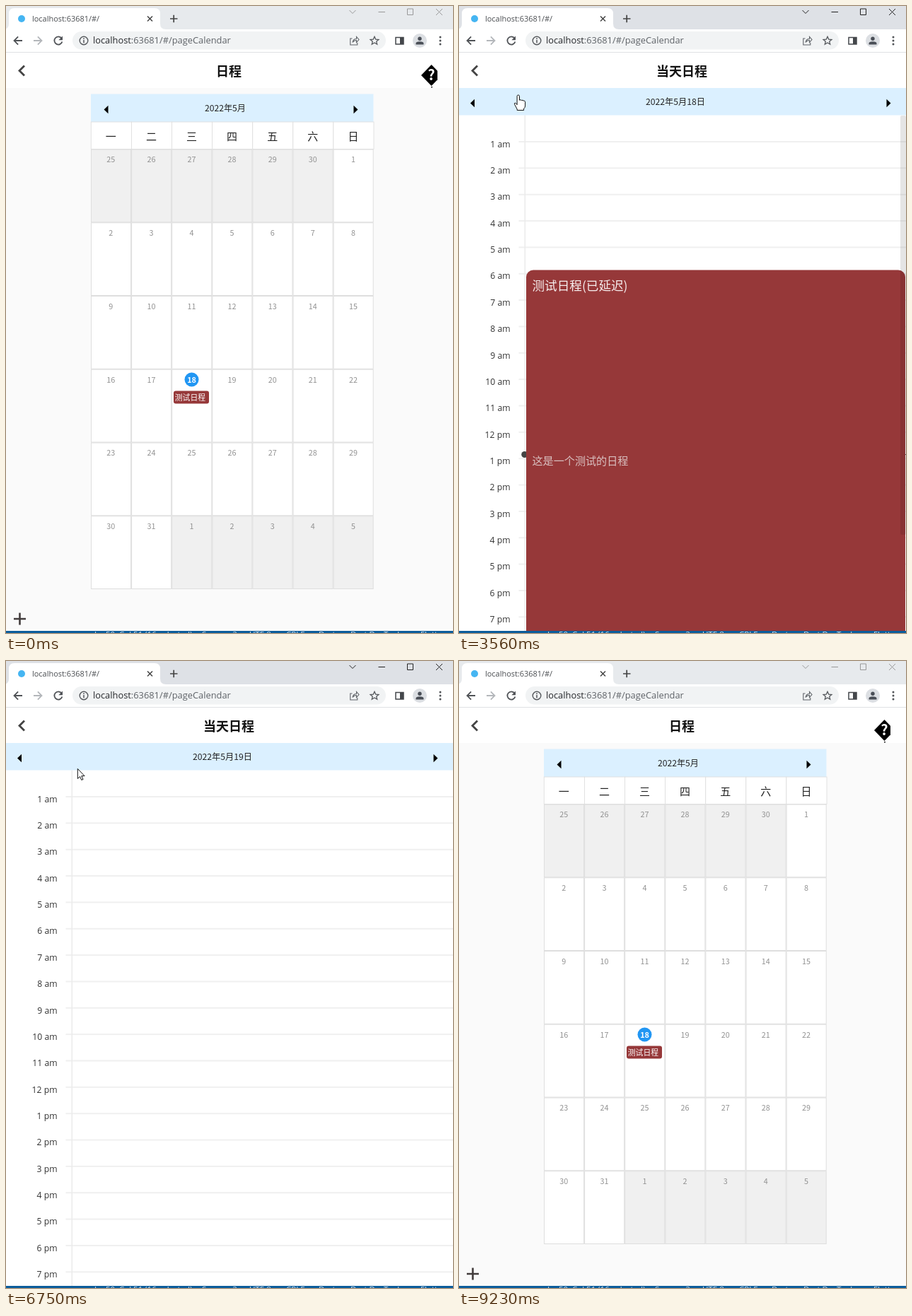
An HTML page that plays this animation: 632x887 px, repeating every 9300 ms.

```html
<!DOCTYPE html>
<html lang="zh">
<head>
<meta charset="utf-8">
<title>日程</title>
<style>
  html, body { margin: 0; width: 100%; height: 100%; overflow: hidden; background: #fff; }
  svg { display: block; width: 632px; height: 887px; }
  text { font-family: "Noto Sans CJK SC", "Noto Sans CJK", "Noto Sans CJK JP", sans-serif; }
  .latin { font-family: "Open Sans", "Noto Sans", sans-serif; }
  .mid { text-anchor: middle; }
  .line { fill: none; stroke-linecap: butt; }
</style>
</head>
<body>
<svg id="stage" viewBox="0 0 632 887"></svg>
<script>
const LOOP = 9300, WIDTH = 632, HOUR = 37.35, DAY_TOP = 154.65;
const RED = '#963839', HEADER = '#dbf0ff';

const rect = (x, y, w, h, fill, extra = '') =>
  `<rect x="${x}" y="${y}" width="${w}" height="${h}" fill="${fill}" ${extra}/>`;
const text = (x, y, size, fill, value, extra = '') =>
  `<text x="${x}" y="${y}" font-size="${size}" fill="${fill}" ${extra}>${value}</text>`;
const mid = (x, y, size, fill, value, extra = '') =>
  text(x, y, size, fill, value, `class="mid" ${extra}`);
const line = (d, stroke, width = 1, extra = '') =>
  `<path class="line" d="${d}" stroke="${stroke}" stroke-width="${width}" ${extra}/>`;
const circle = (x, y, r, fill, extra = '') =>
  `<circle cx="${x}" cy="${y}" r="${r}" fill="${fill}" ${extra}/>`;
const range = n => [...Array(n).keys()];

const triangles = (left, right, y) =>
  `<path d="M${left} ${y - 5.7}v11.4l-6-5.7ZM${right} ${y - 5.7}v11.4l6-5.7Z"/>`;
const appBar = title =>
  rect(0, 66, WIDTH, 50, '#fff') +
  mid(315, 98.8, 18, '#111', title, 'font-weight="700"');
const backIcon = line('M26 84.5l-7 7 7 7', '#444', 2.8);

function browser() {
  return `<rect id="strip" width="632" height="34"/>
    ${rect(0, 33, WIDTH, 33, '#fff')}
    <path d="M-4 33q8 0 8-8V11q0-8 8-8h198q8 0 8 8v14q0 8 8 8Z" fill="#fff"/>
    ${circle(22, 18, 5, '#45b5f2')}
    ${text(37, 22, 10.95, '#4a4d51', 'localhost:63681/#/', 'class="latin"')}
    ${line('M200 14.5l7 7m0-7l-7 7', '#444', 1.5)}
    ${line('M232 18h10.5M237.2 12.7v10.5', '#444', 1.7)}
    <g id="controls">${line('M485.5 6l4.5 4.5 4.5-4.5M526.5 8.5h9.5M567.5 4h8v8.5h-8ZM608 4l9 9m0-9l-9 9', 'currentColor')}</g>
    ${line('M23 49H11.5m5.6-5.6L11.5 49l5.6 5.6', '#505357', 1.8)}
    ${line('M39 49h11.5m-5.6-5.6L50.5 49l-5.6 5.6', '#b4b7bb', 1.8)}
    ${line('M78.2 45.2a5.6 5.6 0 1 0 1.2 5.3', '#505357', 1.8)}
    <path d="M80 42.5v5.7h-5.7Z" fill="#505357"/>
    ${rect(94, 36, 443, 25.5, '#f1f3f4', 'rx="12.7"')}
    ${circle(110, 49, 5.8, 'none', 'stroke="#55585c" stroke-width="1.4"')}
    ${line('M110 45.3v1.6M110 48v4.2', '#55585c', 1.5)}
    <text class="latin" x="123" y="53.4" font-size="12.85" fill="#25272b">localhost<tspan fill="#5f6368">:63681/#/pageCalendar</tspan></text>
    ${line('M489.5 46h-2.7v9h10v-3M490 51.5q.8-5 5.5-5v-3l3.5 4-3.5 4v-3q-3.500 0-5.500 3Z', '#5f6368', 1.1)}
    <path d="M521 43.3l1.7 3.800 4.200.4-3.200 2.700 1 4-3.700-2.200-3.700 2.200 1-4-3.200-2.700 4.200-.4Z" fill="none" stroke="#55585c" stroke-width="1.3"/>
    ${rect(551, 44.5, 11, 9.5, 'none', 'stroke="#44474b" stroke-width="1.5"')}
    ${rect(557, 44.5, 5, 9.5, '#44474b')}
    ${circle(585, 49, 10, '#dcdfe3')}
    ${circle(585, 46.2, 2.7, '#4a4f57')}
    <path d="M579.5 54.500v-1.500q0-2.800 5.500-2.800t5.500 2.800v1.500Z" fill="#4a4f57"/>
    ${[44, 49, 54].map(y => circle(614, y, 1.5, '#505357')).join('')}
    ${rect(0, 65, WIDTH, 1, '#dfe1e4')}`;
}

function calendar() {
  const col = i => 120 + 57.1 * i, row = i => 202.5 + 103.75 * i;
  const cells = range(42).map(i => {
    const x = col(i % 7), y = row(Math.floor(i / 7));
    const offset = i - 5, outside = offset < 1 || offset > 31;
    const day = offset < 1 ? offset + 30 : offset > 31 ? offset - 31 : offset;
    const today = offset === 18;
    return rect(x + .5, y + .5, 56.1, 102.75, outside ? '#f0f0f0' : '#fff', 'stroke="#dedede"') +
      (today ? circle(x + 28.3, y + 14.8, 10, '#2196f3') : '') +
      mid(x + 28.3, y + 18.9, 10.8, today ? '#fff' : '#929292', day, today ? 'font-weight="700"' : '');
  }).join('');
  const week = [...'一二三四五六日'].map((name, i) =>
    rect(col(i) + .3, 164, 57.1, 38.5, '#fff', 'stroke="#dedede" stroke-width=".9"') +
    mid(col(i) + 28.3, 189.6, 15, '#222', name)).join('');
  return rect(0, 66, WIDTH, 818, '#fafafa') + appBar('日程') + backIcon +
    `<path d="M587 98l14.500-15 8.500 8.800v12.400L601.500 113Z"/>
     ${mid(601.5, 105, 20, '#fff', '?', 'font-weight="700"')}
     ${circle(602, 114.7, 1, '#222')}` +
    rect(120, 124.5, 399.5, 39.5, HEADER) + triangles(144.5, 491.5, 146.5) +
    mid(310, 149.3, 12.15, '#222', '2022年5月') + week + cells +
    rect(237, 544.5, 50, 18, RED, 'rx="3"') +
    text(238.8, 557.8, 10.8, '#fff', '测试日程', 'font-weight="500"') +
    line('M11 867h17M19.500 858.500v17', '#423c3c', 2.6);
}

function schedule(day) {
  const hours = range(23).map(i => {
    const h = i + 1, y = DAY_TOP + h * HOUR;
    return rect(84.500, y - 1, 547.500, 2, '#f0f0f0') +
      text(72.5, y + 7.7, 12.2, '#333', `${h > 12 ? h - 12 : h} ${h < 12 ? 'am' : 'pm'}`,
        'class="latin" text-anchor="end"');
  }).join('');
  const event = line('M93 634.500h539', '#555') + circle(92.7, 634.5, 4.5, '#444') +
    rect(95, 373.5, 536, 520, RED, 'rx="10"') +
    text(103.5, 401.8, 17.6, '#f6eeee', '测试日程(已延迟)') +
    text(103.5, 649, 15.1, '#d9c0c0', '这是一个测试的日程');
  return `<g id="day${day}">${rect(0, 154, WIDTH, 900, '#fff')}${hours}
    ${rect(92.5, 154, 1.5, 900, '#ebebeb')}${day === 18 ? event : ''}</g>`;
}

function dayPage() {
  return rect(0, 66, WIDTH, 818, '#fff') + `<g clip-path="url(#list)">
    ${[17, 18, 19].map(schedule).join('')}
    ${rect(624, 155, 8, 593, '#000', 'id="thumb" rx="2"')}</g>` +
    appBar('当天日程') +
    `<g clip-path="url(#bar)">${circle(22, 91, 31, '#000', 'id="ripple"')}</g>` + backIcon +
    rect(0, 116, WIDTH, 38.5, HEADER) + triangles(22, 604.5, 137.5) +
    mid(306, 140.3, 12.2, '#222', '', 'id="date"');
}

function statusBar() {
  const items = [[125, 'Ln 50, Col 51 (16 selected)'], [277, 'Spaces: 2'], [344, 'UTF-8'],
    [396, 'CRLF'], [442, 'Dart'], [487, 'Dart DevTools'], [586, 'Flutter']];
  return rect(0, 884, WIDTH, 3, '#0b5c9b') + '<g clip-path="url(#status)">' +
    items.map(([x, label]) => text(x, 892.5, 11.500, '#d5e3ee', label, 'class="latin"')).join('') + '</g>';
}

const clip = (id, y, h) => `<clipPath id="${id}">${rect(0, y, WIDTH, h, '#000')}</clipPath>`;
const stage = document.getElementById('stage');
stage.innerHTML = `<defs>${clip('view', 66, 818)}${clip('bar', 66, 50)}
    ${clip('list', 154.5, 729.5)}${clip('status', 884, 3)}</defs>
  ${rect(0, 0, WIDTH, 887, '#fff')}
  <g clip-path="url(#view)">
    <g id="calendar">${calendar()}</g>
    ${rect(0, 66, WIDTH, 818, '#000', 'id="scrim"')}
    <g id="page">${dayPage()}</g>
  </g>
  ${browser()}${statusBar()}
  <g id="cursor" fill="#fff" stroke="#111" stroke-linejoin="round">
    <path id="arrow" d="M.5.5V14.500L3.800 11.500 6 16.500 8.200 15.500 6 10.700H10.300Z"/>
    <path id="hand" d="M-1.700 1.700a1.700 1.700 0 0 1 3.400 0V7.200q1.600-1 3 .3 1.600-.8 2.800.6 2-.4 2.300 1.600V15q0 3-2 4.200v2.300H-1.600V20L-5 13.600q-1-2 .4-2.500 1.200 0 2.900 2.600Z"/>
  </g>
  ${circle(0, 0, 10.5, '#f5e128', 'id="press" fill-opacity=".52"')}`;

const el = Object.fromEntries([...stage.querySelectorAll('[id]')].map(e => [e.id, e]));
const set = (node, attrs) => { for (const k in attrs) node.setAttribute(k, attrs[k]); };
const show = (node, on) => set(node, { visibility: on ? 'visible' : 'hidden' });

const progress = (t, from, to) => Math.min(1, Math.max(0, (t - from) / (to - from)));
const easeOut = p => 1 - (1 - p) ** 3;
const easeInOut = p => p * p * (3 - 2 * p);
const zoom = k => `translate(316 475) scale(${k}) translate(-316 -475)`;

function along(t, points) {
  const next = points.findIndex(p => p[0] > t);
  if (next === 0) return points[0].slice(1);
  if (next < 0) return points[points.length - 1].slice(1);
  const a = points[next - 1], b = points[next], p = progress(t, a[0], b[0]);
  return a.slice(1).map((v, i) => v + (b[i + 1] - v) * p);
}

const CURSOR = [[200, 600, 888], [1000, 267, 565], [2140, 267, 565], [2450, 345, 695],
  [3090, 345, 695], [3560, 84, 126], [3720, 50, 119], [3890, 19, 134], [4480, 19, 134],
  [4950, 605, 134], [6450, 605, 134], [6750, 101, 152], [7080, 30, 127], [7560, 30, 127],
  [7690, 27, 84], [8380, 27, 84], [8800, 600, 875]];
const SCROLL = [[2450, 0], [2520, 100], [2620, 100], [2680, 167], [2820, 167], [2880, 67], [2960, 67], [3020, 0]];
const THUMB = [[2440, 0], [2560, .1], [3580, .1], [3880, 0]];
const PRESSES = [[1670, 2000], [4080, 4250], [5080, 5250], [6150, 6350], [7280, 7450], [7880, 8050]];

function currentDay(t) {
  const turn = start => easeInOut(progress(t, start, start + 300));
  const snap = t < 5210 ? 0 : .96 + .04 * easeOut(progress(t, 5210, 5460));
  return 18 - turn(4150) + snap + turn(6350) - turn(7340);
}

function draw(t) {
  const active = t >= 200 && t < 9230;
  set(el.strip, { fill: active ? '#dee1e6' : '#e7eaed' });
  set(el.controls, { color: active ? '#222' : '#999' });

  const closing = progress(t, 8150, 8450);
  const opened = t >= 1670 && t < 8230;
  const opening = easeOut(progress(t, 1670, 1800));
  show(el.page, opened);
  show(el.scrim, opened && t < 1800);
  set(el.scrim, { opacity: .6 });
  set(el.page, {
    transform: zoom(.9915 + .0085 * opening - .1 * easeOut(closing)),
    opacity: 1 - progress(t, 8170, 8230)
  });
  const behind = t < 1670 ? 1 : t < 8150 ? 1.05 : 1.1 - .1 * easeOut(closing);
  set(el.calendar, { transform: zoom(behind) });

  const day = currentDay(t), [scroll] = along(t, SCROLL);
  for (const d of [17, 18, 19])
    set(el['day' + d], { transform: `translate(${(d - day) * WIDTH} ${-scroll})` });
  el.date.textContent = `2022年5月${Math.round(day)}日`;
  set(el.thumb, { y: 155 + scroll * 730 / 896, opacity: along(t, THUMB)[0] });
  set(el.ripple, { r: 31 * easeOut(progress(t, 7860, 8060)), opacity: t < 7880 ? 0 : .11 });

  const [x, y] = along(t, CURSOR);
  const pointing = opened && y > 116 && y < 150;
  const inside = t >= 200 && t < 8830;
  set(el.cursor, { transform: `translate(${x} ${y})` });
  show(el.arrow, inside && !pointing);
  show(el.hand, inside && pointing);
  set(el.press, { cx: x, cy: y });
  show(el.press, PRESSES.some(([from, to]) => t >= from && t < to));
}

const start = performance.now();
function tick() {
  draw((performance.now() - start) % LOOP);
  requestAnimationFrame(tick);
}
tick();
</script>
</body>
</html>
```
